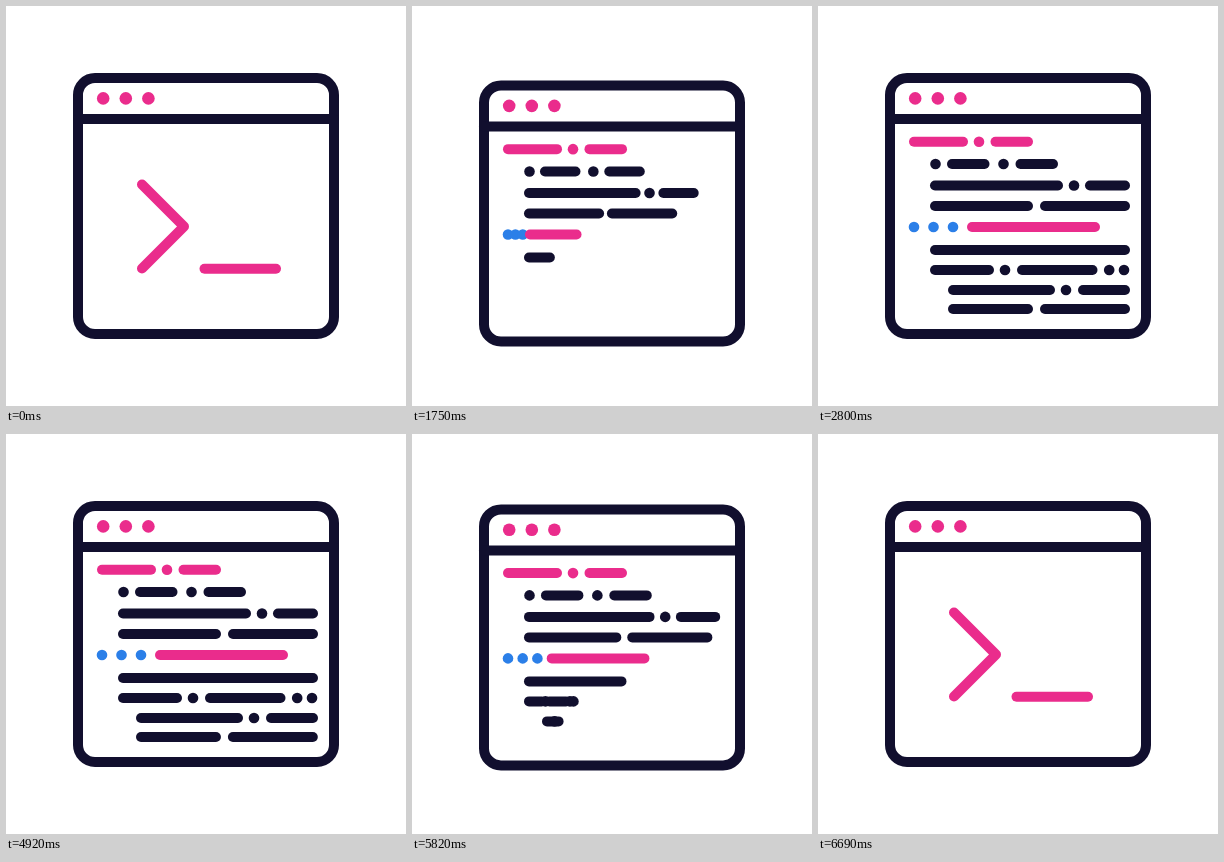
An HTML page with a canvas that plays this animation: 400x400 px, repeating every 6.72 s.

```html
<!DOCTYPE html>
<html lang="en">
<head>
<meta charset="utf-8">
<title>Code window</title>
<style>
  html, body { margin: 0; width: 100%; height: 100%; overflow: hidden; background: #fff; }
  canvas { display: block; width: 100vmin; height: 100vmin; margin: auto; }
</style>
</head>
<body>
<canvas id="stage"></canvas>
<script>
const LOOP = 6720, STEP = 30, STEPS = 60;
const OPEN_AT = 1000, CLOSE_AT = 4890;
const SWAP = 12;          // step at which the prompt gives way to the code
const PEAK = 14, DIP = 16;
const NAVY = '#110f2e', PINK = '#ea2c8c', BLUE = '#2b7fe8';

const canvas = document.getElementById('stage');
const ctx = canvas.getContext('2d');

// Each part is [from, to] between round cap centres; one number is a dot.
const lines = [
  { y: 135.7, start: 8, span: 17, color: PINK, parts: [[96, 145], [161], [177.5, 210]] },
  { y: 158, start: 10, span: 20, parts: [[117.5], [134, 166.5], [185.5], [202.5, 235]] },
  { y: 179.5, start: 12, span: 20, parts: [[117, 240], [256], [272, 307]] },
  { y: 200, start: 14, span: 20, parts: [[117, 210], [227, 307]] },
  { y: 221, start: 18, span: 20, color: PINK, dots: BLUE, parts: [[96], [115.5], [135], [154, 277]] },
  { y: 244, start: 21, span: 20, parts: [[117, 307]] },
  { y: 264, start: 22, span: 25, parts: [[117, 171], [187], [204, 274.5], [291.2], [306]] },
  { y: 284, start: 24.5, span: 28, parts: [[135, 232], [248], [265, 307]] },
  { y: 303, start: 31, span: 29, parts: [[135, 210], [227, 307]] }
];

const clamp = (v, lo, hi) => Math.min(hi, Math.max(lo, v));
const smooth = x => x * x * (3 - 2 * x);

// Cubic bezier (0.4, 0, 0.35, 1)
function ease(x) {
  let lo = 0, hi = 1;
  for (let i = 0; i < 20; i++) {
    const s = (lo + hi) / 2, r = 1 - s;
    if (1.2 * r * r * s + 1.05 * r * s * s + s * s * s < x) lo = s;
    else hi = s;
  }
  return smooth((lo + hi) / 2);
}

const progress = (step, start, span) => {
  const x = clamp((step - start) / span, 0, 1);
  return x === 0 || x === 1 ? x : ease(x);
};

function stepAt(t) {
  const closing = t >= CLOSE_AT;
  const n = clamp(Math.floor((t - (closing ? CLOSE_AT : OPEN_AT)) / STEP), 0, STEPS);
  return closing ? STEPS - n : n;
}

function stroke(color, ...points) {
  ctx.strokeStyle = color;
  ctx.beginPath();
  points.forEach(([x, y], i) => i ? ctx.lineTo(x, y) : ctx.moveTo(x, y));
  ctx.stroke();
}

function dot(x, y, r, color) {
  ctx.fillStyle = color;
  ctx.beginPath();
  ctx.arc(x, y, r, 0, 2 * Math.PI);
  ctx.fill();
}

function drawFrame() {
  ctx.strokeStyle = NAVY;
  ctx.beginPath();
  ctx.roundRect(72, 72, 256, 256, 17);
  ctx.stroke();
  stroke(NAVY, [72, 113], [328, 113]);
  for (const x of [97.2, 119.8, 142.4]) dot(x, 92.4, 6.3, PINK);
}

function drawPrompt(step) {
  const p = smooth(step / PEAK);
  const dx = 38 * p;
  stroke(PINK, [136 + dx, 178.5], [178 + dx, 220.5], [136 + dx, 262.5]);
  stroke(PINK, [198.5 + 30 * p, 262.7], [270, 262.7]);
}

function drawLine({ y, start, span, parts, color = NAVY, dots = color }, step) {
  const p = progress(step, start, span);
  if (p < 0.05) return;
  const left = parts[0][0];
  const place = x => left + (x - left) * p;
  for (const [from, to] of parts) {
    if (to === undefined) dot(place(from), y, 5.3, dots);
    else stroke(color, [place(from), y], [place(to), y]);
  }
}

function draw(t) {
  const step = stepAt(t);
  const dy = step < PEAK
    ? DIP * smooth(step / PEAK)
    : DIP * (1 - progress(step, PEAK, 26));

  const size = Math.round(Math.min(innerWidth, innerHeight) * devicePixelRatio);
  if (canvas.width !== size) canvas.width = canvas.height = size;
  const k = size / 400;
  ctx.setTransform(k, 0, 0, k, 0, 0);
  ctx.fillStyle = '#fff';
  ctx.fillRect(0, 0, 400, 400);
  ctx.translate(0, dy);
  ctx.lineWidth = 10;
  ctx.lineCap = ctx.lineJoin = 'round';

  drawFrame();
  if (step < SWAP) drawPrompt(step);
  else lines.forEach(line => drawLine(line, step));
}

const begin = performance.now();
function tick() {
  draw((performance.now() - begin) % LOOP);
  requestAnimationFrame(tick);
}
tick();
</script>
</body>
</html>
```
